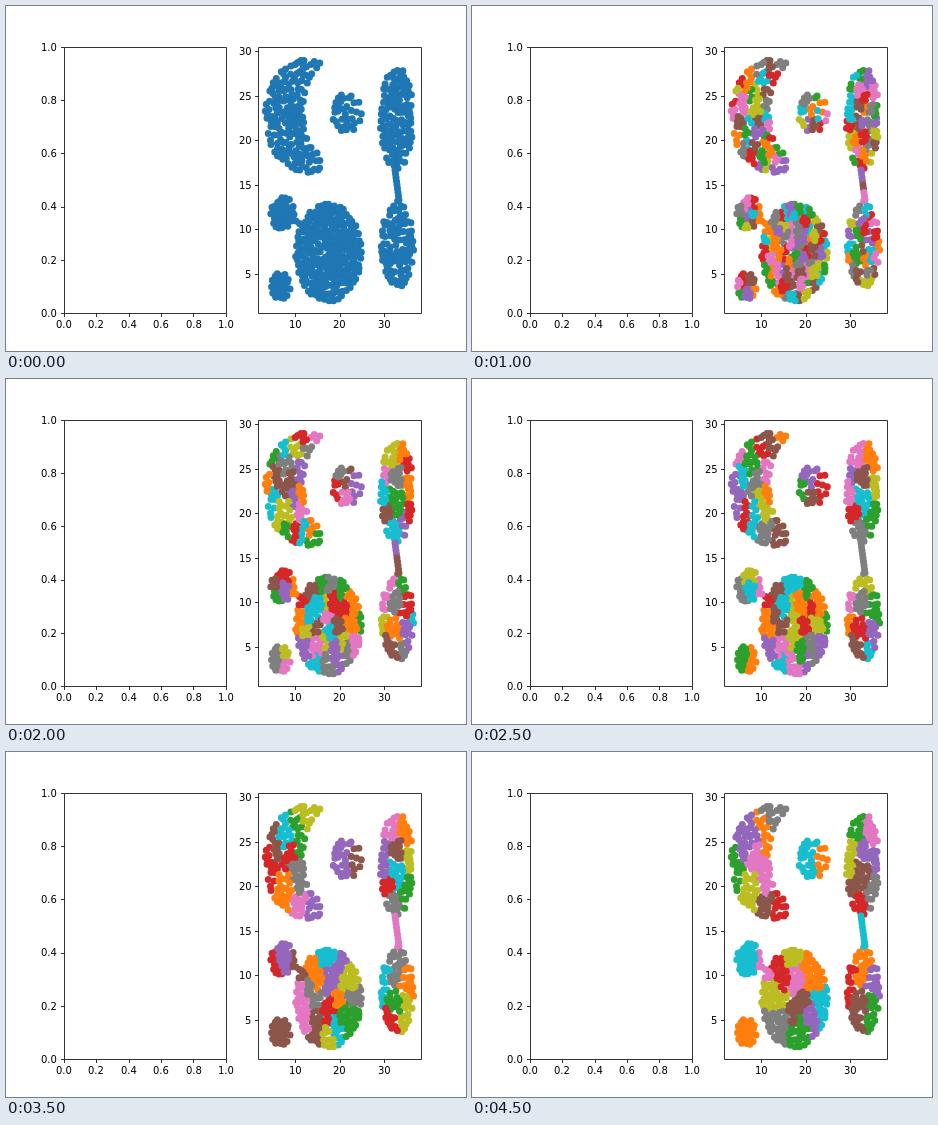
An HTML page that plays this animation: 460x345 px, repeating every 5000 ms.

```html
<!DOCTYPE html>
<html lang="en">
<head>
<meta charset="utf-8">
<title>Agglomerative clustering</title>
<style>
  html, body { margin: 0; width: 100%; height: 100%; overflow: hidden; background: #fff; }
  svg { display: block; width: 460px; height: 345px; }
  text { font: 10px "DejaVu Sans", sans-serif; fill: #000; }
  .axes { fill: none; stroke: #000; stroke-width: 0.8; }
</style>
</head>
<body>
<svg id="stage" viewBox="0 0 460 345"></svg>
<script>
const STEP = 500, STEPS = 10;
const BLUE = '#1f77b4';
const CYCLE = ['#ff7f0e', '#2ca02c', '#d62728', '#9467bd', '#8c564b',
               '#e377c2', '#7f7f7f', '#bcbd22', '#17becf'];

let seed = 20;
function random() {
  seed = (seed + 0x6D2B79F5) | 0;
  let t = Math.imul(seed ^ (seed >>> 15), 1 | seed);
  t = (t + Math.imul(t ^ (t >>> 7), 61 | t)) ^ t;
  return ((t ^ (t >>> 14)) >>> 0) / 4294967296;
}

const ellipse = (cx, cy, rx, ry) => ({
  cx, cy, rx, ry,
  holds: (x, y) => ((x - cx) / rx) ** 2 + ((y - cy) / ry) ** 2 <= 1,
});

// A data unit is twice as tall as it is wide on screen
const gap = (a, b) => 4 * (a.x - b.x) ** 2 + (a.y - b.y) ** 2;

// Evenly scattered points: keep the candidate farthest from its neighbours
function scatter(count, { cx, cy, rx, ry, holds }) {
  const points = [];
  while (points.length < count) {
    let best, bestGap = -1;
    for (let tries = 0; tries < 10;) {
      const p = { x: cx + rx * (2 * random() - 1), y: cy + ry * (2 * random() - 1) };
      if (!holds(p.x, p.y)) continue;
      tries++;
      const nearest = Math.min(...points.map(q => gap(p, q)));
      if (nearest > bestGap) { best = p; bestGap = nearest; }
    }
    points.push(best);
  }
  return points;
}

function line(count, x0, y0, x1, y1) {
  return Array.from({ length: count }, (_, i) => {
    const t = i / (count - 1);
    return { x: x0 + t * (x1 - x0), y: y0 + t * (y1 - y0) };
  });
}

const outer = ellipse(302, 110, 43, 57), bite = ellipse(325, 105, 28, 48);
const crescent = {
  ...outer,
  holds: (x, y) => outer.holds(x, y) && !bite.holds(x, y) && x < 314.5,
};

const points = [
  ...scatter(170, crescent),
  ...scatter(34, ellipse(340.5, 107, 15, 19.5)),
  ...scatter(128, ellipse(390.7, 112, 16.7, 51)),
  ...line(9, 389, 164, 393, 194),
  ...scatter(97, ellipse(391.5, 238, 16.3, 43.5)),
  ...scatter(273, ellipse(322.5, 246.5, 33, 49)),
  ...line(3, 290, 215, 297, 220),
  ...scatter(41, ellipse(276.5, 207, 12, 16.5)),
  ...scatter(34, ellipse(274.5, 281, 10, 14.5)),
];

// Ward linkage: the pairs of clusters in the order they merge
function linkage() {
  const n = points.length, merges = [];
  const x = Float64Array.from(points, p => 2 * p.x);
  const y = Float64Array.from(points, p => p.y);
  const size = new Float64Array(n).fill(1);
  const alive = points.map((_, i) => i);
  while (alive.length > 8) {
    let least = Infinity, keep, gone, slot;
    for (let i = 1; i < alive.length; i++) {
      const a = alive[i], ax = x[a], ay = y[a], as = size[a];
      for (let j = 0; j < i; j++) {
        const b = alive[j], dx = ax - x[b], dy = ay - y[b];
        const cost = (dx * dx + dy * dy) * as * size[b] / (as + size[b]);
        if (cost < least) { least = cost; keep = b; gone = a; slot = i; }
      }
    }
    const total = size[keep] + size[gone];
    x[keep] = (x[keep] * size[keep] + x[gone] * size[gone]) / total;
    y[keep] = (y[keep] * size[keep] + y[gone] * size[gone]) / total;
    size[keep] = total;
    alive.splice(slot, 1);
    merges.push([keep, gone]);
  }
  return merges;
}

const merges = linkage();

// Clusters with their colours; lone points stay blue
function clustersAt(step) {
  const clusters = points.map((_, i) => [i]);
  const left = step ? Math.round(420 / step ** 1.1) : points.length;
  for (const [keep, gone] of merges.slice(0, points.length - left)) {
    clusters[keep].push(...clusters[gone]);
    clusters[gone] = [];
  }
  let next = step * 4;
  return clusters.filter(c => c.length).map(members => ({
    members,
    color: step < 2 && members.length === 1 ? BLUE : CYCLE[next++ % CYCLE.length],
  }));
}

const scenes = Array.from({ length: STEPS }, (_, step) => clustersAt(step));

const stage = document.getElementById('stage');
function add(parent, tag, attrs, text = '') {
  const node = document.createElementNS('http://www.w3.org/2000/svg', tag);
  for (const key in attrs) node.setAttribute(key, attrs[key]);
  node.textContent = text;
  return parent.appendChild(node);
}

const cloud = add(stage, 'g', {});
const dots = points.map(p => add(cloud, 'circle', { cx: p.x, cy: p.y, r: 3.5 }));

const TOP = 40.87, BOTTOM = 306.98, WIDTH = 162.33;
const snap = v => Math.floor(v + 0.5) + 0.5;

// Text starts on a whole pixel; align is 0.5 for centred, 1 for right-aligned
function label(x, y, align, text) {
  const node = add(stage, 'text', { y: Math.round(y) }, text);
  node.setAttribute('x', Math.round(x - align * node.getComputedTextLength()));
}

function axes(left, [x0, x1], [y0, y1], xTicks, yTicks, digits) {
  const l = snap(left), r = snap(left + WIDTH), t = snap(TOP), b = snap(BOTTOM);
  let path = `M${l} ${t}H${r}V${b}H${l}Z`;
  for (const v of xTicks) {
    const x = left + (v - x0) / (x1 - x0) * WIDTH;
    path += `M${snap(x)} ${b}v3.5`;
    label(x, 322, 0.5, v.toFixed(digits));
  }
  for (const v of yTicks) {
    const y = BOTTOM - (v - y0) / (y1 - y0) * (BOTTOM - TOP);
    path += `M${l} ${snap(y)}h-3.5`;
    label(left - 7, y + 3.8, 1, v.toFixed(digits));
  }
  add(stage, 'path', { d: path, class: 'axes' });
}

const range = (from, to, by) =>
  Array.from({ length: Math.round((to - from) / by) + 1 }, (_, i) => from + i * by);
axes(57.6, [0, 1], [0, 1], range(0, 1, 0.2), range(0, 1, 0.2), 1);
axes(252.39, [1.69, 38.21], [0.59, 30.51], range(10, 30, 10), range(5, 30, 5), 0);

const start = performance.now();
let shown = -1;
function render() {
  const step = Math.floor((performance.now() - start) / STEP) % STEPS;
  if (step !== shown) {
    shown = step;
    // Clusters are painted one after another
    for (const { members, color } of scenes[step]) {
      for (const i of members) {
        dots[i].setAttribute('fill', color);
        cloud.append(dots[i]);
      }
    }
  }
  requestAnimationFrame(render);
}
render();
</script>
</body>
</html>
```
